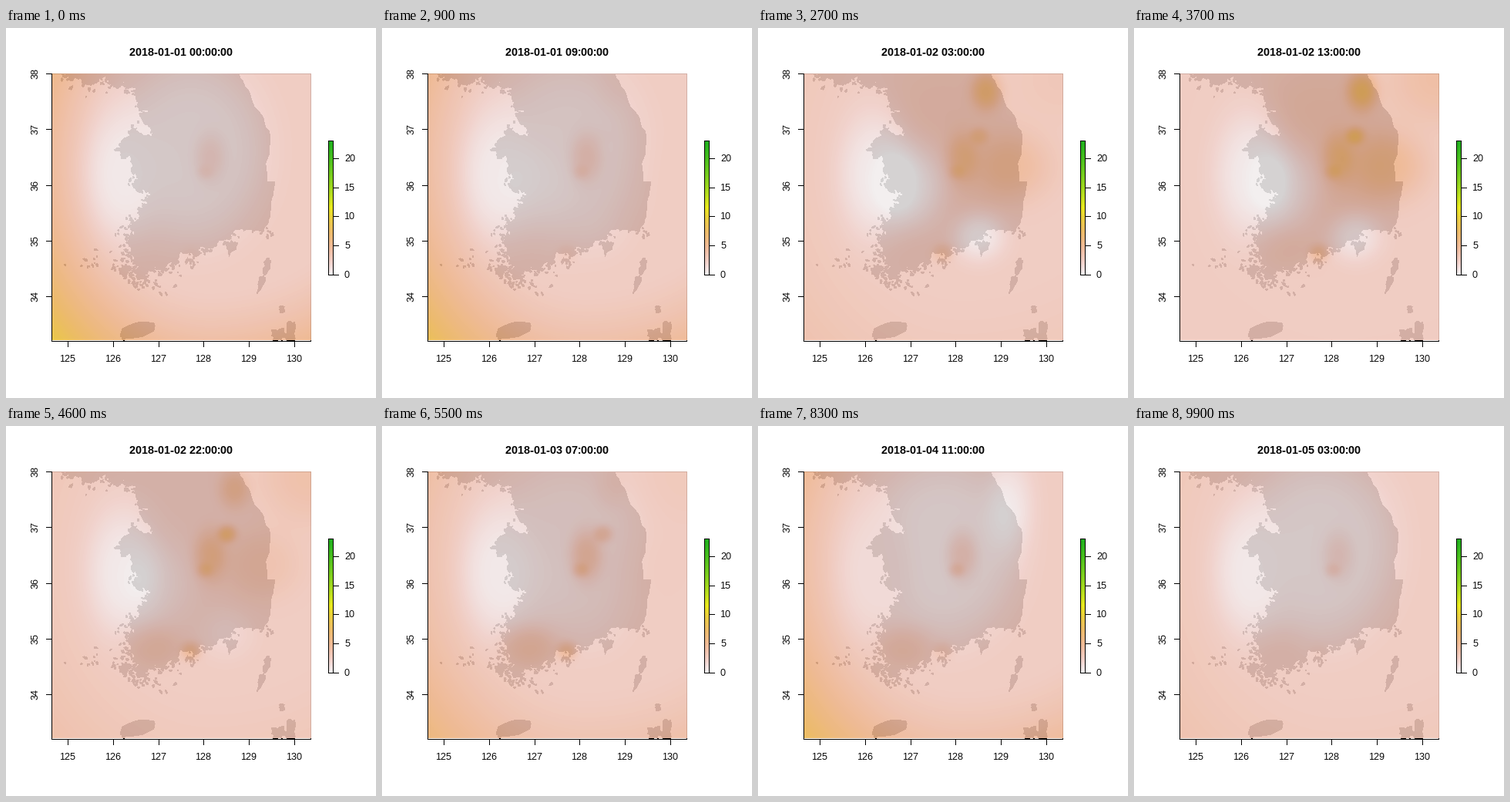
These frames come from a looping animation (480x480 px, 10000 ms). A matplotlib script:

```python
import numpy as np
import matplotlib.pyplot as plt
from matplotlib.animation import FuncAnimation
from matplotlib.collections import LineCollection, PolyCollection
from matplotlib.colors import ListedColormap, hsv_to_rgb

SIZE, DPI, HOURS = 480, 100, 100
PX = 72 / DPI
ALPHA, VMAX = 0.89, 23
LEFT, RIGHT, TOP, BOTTOM = 59, 395, 59, 406
rng = np.random.default_rng(18)

plt.rcParams.update({"font.family": ["Liberation Sans", "DejaVu Sans"],
                     "text.hinting": "native", "text.hinting_factor": 1})
fig = plt.figure(figsize=(SIZE / DPI, SIZE / DPI), dpi=DPI, facecolor="white")
ax = fig.add_axes([0, 0, 1, 1])


def terrain(n=255):
    """Pale grey through orange and yellow to green."""
    t = np.linspace(0, 1, n)
    u = np.clip(2 * t, 0, 1)
    w = np.clip(2 * t - 1, 0, 1)
    return ListedColormap(hsv_to_rgb(np.column_stack(
        [(u + w) / 6, u, 0.95 - 0.05 * u - 0.25 * w])))


# ---- land ----
def rough(points, amount, depth=4):
    """Fractal coast: shift the midpoint of every segment sideways."""
    p = np.array(points, float)
    for _ in range(depth):
        a, b = p[:-1], p[1:]
        side = (b - a)[:, ::-1] * [-1, 1]
        out = np.empty((len(a) * 2 + 1, 2))
        out[::2] = p
        out[1::2] = (a + b) / 2 + side * rng.normal(0, amount, (len(a), 1))
        p = out
    return p


def blob(x, y, rx, ry, turn=0.0, jag=0.2, n=18):
    """Irregular ellipse."""
    a = np.linspace(0, 2 * np.pi, n, endpoint=False)
    r = 1 + rng.normal(0, jag, n)
    u, v = rx * r * np.cos(a), ry * r * np.sin(a)
    c, s = np.cos(turn), np.sin(turn)
    return np.column_stack([x + u * c - v * s, y + u * s + v * c])


north_west = [(80, 59), (82, 67), (106, 74), (122, 64), (136, 73), (152, 70),
              (157, 79), (167, 77), (171, 96), (184, 109), (178, 122), (190, 140)]
west = [(190, 140), (161, 133), (148, 150), (150, 163), (163, 167), (172, 195),
        (166, 201), (185, 213), (175, 222), (184, 228), (170, 235), (173, 245),
        (160, 254), (166, 264), (159, 277), (165, 296), (163, 318)]
south = [(163, 318), (174, 326), (190, 310), (206, 310), (211, 297), (216, 308),
         (236, 292), (244, 296), (249, 283), (262, 285), (290, 273), (330, 264)]
east = [(330, 264), (342, 246), (349, 200), (339, 200), (342, 152), (333, 115),
        (316, 84), (302, 59)]

land = [
    np.vstack([rough(north_west, 0.22), rough(west, 0.22),
               rough(south, 0.22), rough(east, 0.05)]),
    blob(171, 392, 23, 9.5, -0.24, 0.04, 28),
    blob(154, 400, 5, 4),
    blob(338, 309, 4, 11, 0.25),
    blob(331, 330, 3.5, 11, 0.3),
    blob(358, 365, 3.5, 4.5),
    blob(369, 396, 6, 14, 0.1),
    blob(354, 399, 9, 8, 0, 0.3),
    blob(153, 315, 8, 5, -0.5),
    blob(291, 285, 6, 8, 0.3, 0.3)]


def islets(centres, count, spread):
    centres = np.array(centres, float)
    for x, y in centres[rng.integers(len(centres), size=count)]:
        dx, dy = rng.normal(0, spread, 2)
        r = rng.uniform(0.5, 1.6)
        land.append(blob(x + dx, y + dy, r * rng.uniform(0.8, 2.2), r,
                         rng.uniform(0, 3), 0.3, 9))


islets(north_west, 70, 5)
islets(west[:10], 25, 4)
islets(west[12:], 110, 8)
islets(south, 130, 7)
islets([(105, 300), (145, 300), (200, 328)], 35, 10)


# ---- wind field ----
yy, xx = np.mgrid[TOP:BOTTOM - 1, LEFT + 1:RIGHT + 1] + 0.5


def pulse(hour, peak, width):
    return np.exp(-((hour - peak) / width) ** 2)


def disc(x, y, rx, ry, power=2.5):
    return np.exp(-np.hypot((xx - x) / rx, (yy - y) / ry) ** power)


# Open water: wind grows with distance from the peninsula, most to the south-west.
dx = xx - 265
reach = np.hypot(dx * np.where(dx < 0, 1.2, 0.85), yy - 170)
ocean = np.clip((reach - 170) / 171, 0, None) ** 1.5
inland = disc(240, 160, 98, 120, 4)
calm_bay = disc(152, 190, 48, 85, 3)

# Local gusts and lulls: place, radii, change of speed, peak hour, duration.
spots = [(disc(*s[:4]), *s[4:]) for s in [
    (265, 168, 20, 32, 2.2, 50, 60),
    (258, 187, 10, 9, 1.4, 60, 60),
    (287, 140, 12, 11, 3.0, 42, 18),
    (296, 82, 19, 24, 3.8, 34, 14),
    (330, 180, 50, 44, 2.2, 34, 14),
    (240, 292, 13, 12, 2.0, 50, 35),
    (190, 285, 36, 26, 1.6, 65, 25),
    (204, 205, 42, 55, -2.2, 30, 16),
    (286, 270, 34, 32, -2.2, 31, 14),
    (328, 100, 30, 62, -1.4, 83, 9),
    (392, 65, 60, 60, 1.6, 40, 12)]]


def field(hour):
    z = 2.5 + ocean * (3.4 + 3.3 * np.cos(2 * np.pi * hour / 72))
    z += (0.8 + 2.6 * pulse(hour, 34, 17) - z) * inland
    z += (0.6 + 1.4 * pulse(hour, 76, 10) - z) * calm_bay
    for shape, change, peak, width in spots:
        z += shape * change * pulse(hour, peak, width)
    return np.clip(z, 0.2, VMAX)


# ---- drawing ----
def lines(*segments, z=5):
    ax.add_collection(LineCollection(segments, colors="black", linewidths=PX,
                                     antialiaseds=False, zorder=z))


def label(x, y, s, size=12, **kw):
    return ax.text(x, y, s, fontsize=size * PX, va="baseline", **kw)


BAR_L, BAR_R, BAR_T, BAR_B = 418, 424, 146, 320
view = dict(cmap=terrain(), vmin=0, vmax=VMAX, alpha=ALPHA, aspect="auto",
            interpolation="nearest", zorder=3)

shore = PolyCollection(land, facecolors="black", edgecolors="none",
                       antialiaseds=False, zorder=1)
ax.add_collection(shore)
raster = ax.imshow(field(0), extent=(LEFT + 1, RIGHT + 1, BOTTOM - 1, TOP), **view)
ax.imshow(np.linspace(VMAX, 0, 255)[:, None],
          extent=(BAR_L + 0.5, BAR_R + 0.5, BAR_B + 0.5, BAR_T + 0.5), **view)

ax.set_xlim(0, SIZE)
ax.set_ylim(SIZE, 0)
ax.axis("off")
shore.set_clip_path(plt.Rectangle((LEFT, TOP), RIGHT + 1 - LEFT, BOTTOM - TOP,
                                  transform=ax.transData))

# The raster veils the top and right sides of the frame.
lines([(LEFT, TOP), (RIGHT, TOP), (RIGHT, BOTTOM)], z=2)
lines([(LEFT, TOP), (LEFT, BOTTOM), (RIGHT, BOTTOM)])

for i, lon in enumerate(range(125, 131)):
    x = round(80 + i * 58.75)
    lines([(x, BOTTOM), (x, BOTTOM + 7)])
    label(x, 433, str(lon), ha="center")
for i, lat in enumerate(range(38, 33, -1)):
    y = round(TOP + i * 72.25)
    lines([(LEFT - 7, y), (LEFT, y)])
    label(42, y, str(lat), ha="center", rotation=90, rotation_mode="anchor")

lines([(BAR_L, BAR_T), (BAR_R, BAR_T), (BAR_R, BAR_B), (BAR_L, BAR_B), (BAR_L, BAR_T)])
for v in range(0, 21, 5):
    y = round(BAR_B - v * (BAR_B - BAR_T) / VMAX)
    lines([(BAR_R, y), (BAR_R + 7, y)])
    label(439, y + 4, str(v), ha="left")

title = label(227, 36, "", 14, ha="center", weight="bold")


def update(hour):
    raster.set_data(field(hour))
    title.set_text(f"2018-01-{1 + hour // 24:02d} {hour % 24:02d}:00:00")
    return raster, title


anim = FuncAnimation(fig, update, frames=HOURS, interval=100, repeat=True,
                     repeat_delay=0, blit=False)
plt.show()
```
